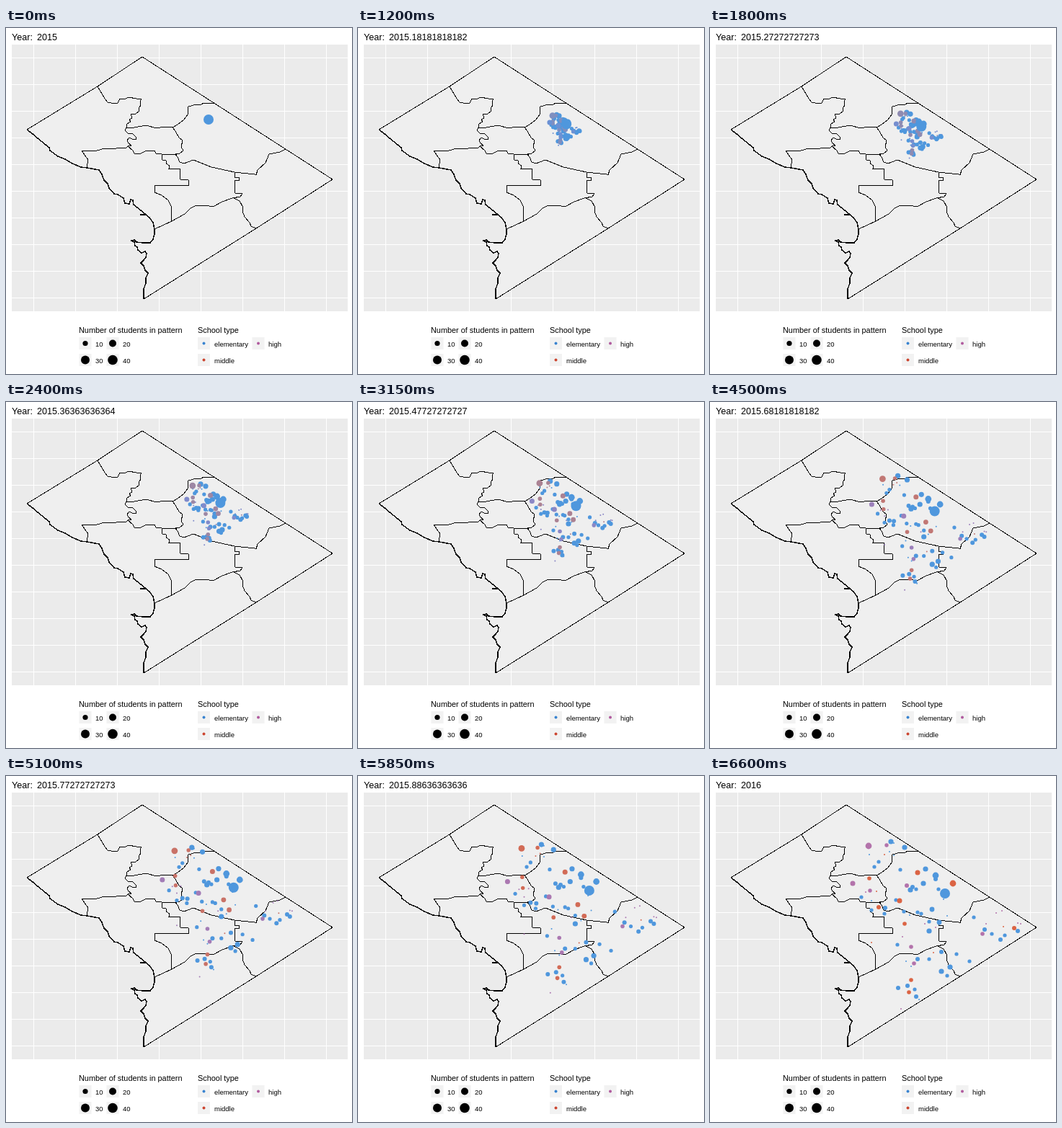
Write an HTML page that moves like this. It is 480 px wide and 480 px high and loops after 8000 ms.

```html
<!DOCTYPE html>
<html lang="en">
<head>
<meta charset="utf-8">
<title>Students by school over time</title>
<style>
  html, body { margin: 0; width: 100%; height: 100%; overflow: hidden; background: #fff; }
  svg { display: block; width: 100vw; height: 100vh; }
  text { font: 9.5px "Liberation Sans", Arial, sans-serif; }
  .heading { font-size: 10.9px; }
  .title { font-size: 12.6px; }
  .map { fill: none; stroke: #000; shape-rendering: crispEdges; }
</style>
</head>
<body>
<svg viewBox="0 0 480 480">
  <rect width="480" height="480" fill="#fff"/>
  <text class="title" x="8" y="17">Year: <tspan id="year" x="43">2015</tspan></text>
  <rect x="8" y="23" width="466" height="370" fill="#ebebeb"/>
  <path id="grid" stroke="#fff" shape-rendering="crispEdges"/>
  <g class="map">
    <path fill="#efefef" stroke="none" d="M189 40 453 210 347 278 191 376 191 362 194 347 197 340 191 330 187 326 193 320 195 313 183 308 174 295 200 298 206 279 199 263 187 253 173 238 163 236 150 230 133 203 129 197 113 194 92 188 61 170 29 141Z"/>
    <path d="M29 141 127 81 189 40 453 210 347 278 191 376"/>
    <path stroke-width="1.5" d="M191 376V362L194 354 194 347 197 340 193 336 191 330 187 326 191 322 194 318 195 313 193 310 188 312 183 308 182 304 179 302 178 297 174 295 178 294 181 297 190 298 200 298 204 293 206 286 206 279 204 270 199 263 194 259 186 259 193 258 187 253 177 245 176 239 173 238 171 244 165 243 163 236 155 231 150 230 143 222 141 216 136 211 133 203 129 197 113 194 104 193 92 188 82 182 72 178 61 170 60 166 44 153 37 147 29 141"/>
    <path d="M127 81 137 98 141 103 151 105 155 104 158 98 164 99 170 96 181 98 188 98 186 102 187 107 185 110 184 116 180 119 173 119 175 125 171 127 173 130 168 133 167 138 178 138 194 135 209 139 220 137 231 138 238 134 247 127 252 120 253 109 264 106 270 107 274 104 288 104"/>
    <path d="M167 138 165 142 169 146 175 146 180 151 180 154 175 154 171 152 168 156 170 160 174 163 169 164 176 170 178 174 187 174 195 170 206 170 208 174 216 175 237 175"/>
    <path d="M112 194 114 183 109 176 105 170 126 170 137 167 153 167 160 166 166 167 170 163"/>
    <path d="M231 138 235 143 240 152 245 156 243 165 246 170 241 174 235 175 238 179 241 186 247 188 260 183 285 193 317 200 345 203 347 204 349 197 360 187 365 175 380 172 388 168"/>
    <path d="M216 175 217 183 222 184 222 188 227 191 226 195 241 195 242 210 253 211 253 218 206 218 206 228 216 232 225 239 229 247 230 268"/>
    <path d="M206 279 230 268 248 258 256 250 262 247 277 246 287 248 300 241 314 236 325 234 328 230 318 229 317 212 324 211 323 207 317 208 317 200"/>
    <path d="M316 236 324 240 329 249 328 254 331 262 338 270 340 275 347 278"/>
  </g>
  <g id="dots"></g>
  <text class="heading" x="101" y="423">Number of students in pattern</text>
  <text class="heading" x="266" y="423">School type</text>
  <g id="legend"></g>
</svg>
<script>
const ELEMENTARY = 0, MIDDLE = 1, HIGH = 2;
const COLORS = ['#4f97dd', '#db6444', '#b373ab'];
const KEY_COLORS = ['#3a84d0', '#cc4630', '#b05a9e'];
const START = { x: 281, y: 127 };
const STEP_MS = 150, STEPS = 44, LOOP_MS = 8000;

// Each group: tween type, closing type, radius, destinations (x, y, ...)
const GROUPS = [
  [ELEMENTARY, ELEMENTARY, 1, [221,109, 255,110, 277,193, 329,194, 272,257, 279,264, 290,310, 324,171, 255,93]],
  [MIDDLE, ELEMENTARY, 1, [249,105]],
  [HIGH, ELEMENTARY, 1, [224,173]],
  [MIDDLE, MIDDLE, 1, [242,109, 310,245, 407,209]],
  [HIGH, MIDDLE, 1, [231,160, 224,231]],
  [ELEMENTARY, HIGH, 1, [313,210, 267,223]],
  [HIGH, HIGH, 1, [216,161, 298,205, 265,323, 383,205, 397,190, 405,187, 427,204, 431,205]],
  [ELEMENTARY, ELEMENTARY, 2.6, [
    234,119, 228,126, 264,130, 286,157, 317,157, 210,168, 258,172, 224,186, 242,191, 269,188,
    288,189, 293,191, 304,202, 260,234, 304,254, 342,247, 360,257, 329,277, 284,296,
    366,196, 391,219, 409,221]],
  [ELEMENTARY, ELEMENTARY, 3, [
    313,143, 281,154, 243,183, 288,254, 321,244, 261,294, 274,291, 286,306, 381,213, 403,227, 427,215]],
  [ELEMENTARY, ELEMENTARY, 3.6, [251,91, 270,99, 299,129, 296,149, 278,158, 304,215, 333,265, 321,271]],
  [ELEMENTARY, HIGH, 3, [273,152]],
  [ELEMENTARY, MIDDLE, 3, [234,182, 422,211]],
  [MIDDLE, MIDDLE, 2.8, [221,142, 270,205, 279,283, 276,300]],
  [MIDDLE, HIGH, 2.7, [245,96, 222,159]],
  [HIGH, HIGH, 2.8, [279,237, 283,260, 378,219]],
  [MIDDLE, ELEMENTARY, 3.4, [308,185, 318,203]],
  [HIGH, MIDDLE, 3.5, [263,173]],
  [MIDDLE, MIDDLE, 3.5, [288,134]],
  [HIGH, HIGH, 3.5, [198,149]],
  [MIDDLE, HIGH, 4.4, [220,97]],
  [ELEMENTARY, MIDDLE, 4.4, [337,149]],
  [ELEMENTARY, ELEMENTARY, 4.4, [313,138]],
  [ELEMENTARY, ELEMENTARY, 7, [326,163]]
];

const $ = id => document.getElementById(id);

function add(parent, tag, attrs, text = '') {
  const el = document.createElementNS('http://www.w3.org/2000/svg', tag);
  for (const name in attrs) el.setAttribute(name, attrs[name]);
  el.textContent = text;
  parent.append(el);
  return el;
}

function addKey(x, y, r, fill, label, labelX) {
  add($('legend'), 'rect', { x: x - 8.5, y: y - 8.5, width: 17, height: 17, fill: '#f2f2f2' });
  add($('legend'), 'circle', { cx: x, cy: y, r, fill });
  add($('legend'), 'text', { x: labelX, y: y + 4.5 }, label);
}

let grid = '';
for (let x = 38.5; x < 474; x += 58) grid += `M${x} 23V393`;
for (let y = 41.5; y < 393; y += 37) grid += `M8 ${y}H474`;
$('grid').setAttribute('d', grid);

addKey(110, 437.5, 3.6, '#000', '10', 124);
addKey(148, 437.5, 5, '#000', '20', 162);
addKey(110, 460.5, 6, '#000', '30', 124);
addKey(148, 460.5, 6.8, '#000', '40', 162);
addKey(274.5, 437.5, 2, KEY_COLORS[ELEMENTARY], 'elementary', 289);
addKey(274.5, 460.5, 2, KEY_COLORS[MIDDLE], 'middle', 289);
addKey(350, 437.5, 2, KEY_COLORS[HIGH], 'high', 364);

const dots = [];
for (const [tween, end, r, places] of GROUPS) {
  for (let i = 0; i < places.length; i += 2) {
    dots.push({ tween, end, x: places[i], y: places[i + 1], el: add($('dots'), 'circle', { r }) });
  }
}

let shown = -1;
function draw(now) {
  requestAnimationFrame(draw);
  const step = Math.min(STEPS, Math.floor(now % LOOP_MS / STEP_MS));
  if (step === shown) return;
  shown = step;
  const p = step / STEPS;
  $('year').textContent = parseFloat((2015 + p).toPrecision(15));
  for (const { tween, end, x, y, el } of dots) {
    el.setAttribute('cx', START.x + (x - START.x) * p);
    el.setAttribute('cy', START.y + (y - START.y) * p);
    // School types take their closing colours at once on the last step
    el.style.fill = p === 1 ? COLORS[end]
      : `color-mix(in lab, ${COLORS[tween]} ${p * 100}%, ${COLORS[ELEMENTARY]})`;
  }
}
draw(0);
</script>
</body>
</html>
```
